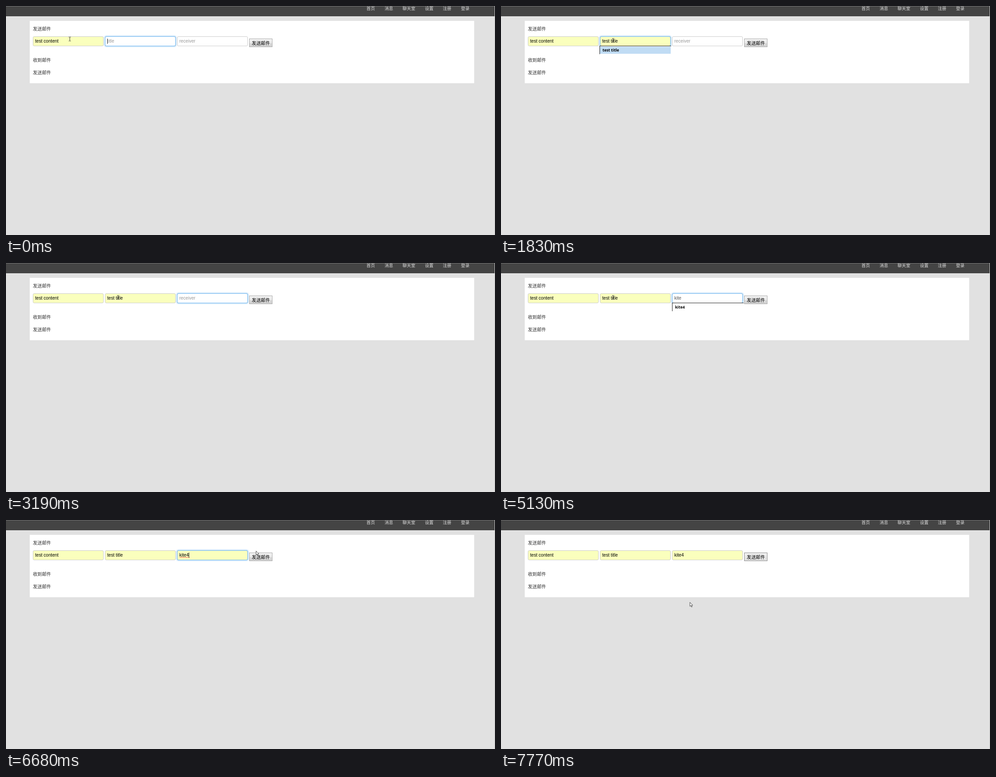
An HTML page that plays this animation: 1092 by 513 pixels, repeating every 8 s.

```html
<!DOCTYPE html>
<html lang="zh">
<head>
<meta charset="utf-8">
<title>发送邮件</title>
<style>
  html, body { margin: 0; width: 100%; height: 100%; overflow: hidden; background: #e1e1e1; }
  svg { display: block; width: 1092px; height: 513px; }
  text { white-space: pre; }
  .zh { font: 10.15px "Noto Sans CJK SC", "Noto Sans CJK", sans-serif; fill: #333; }
  .nav { font-size: 9.5px; fill: #ddd; }
  .input { font: 10.1px "Liberation Sans", Arial, sans-serif; }
  .item { font: bold 8.65px "Open Sans", "Noto Sans", sans-serif; fill: #000; }
</style>
</head>
<body>
<svg id="stage" viewBox="0 0 1092 513">
  <defs>
    <linearGradient id="face" x2="0" y2="1">
      <stop offset="0" stop-color="#f3f3f3"/>
      <stop offset=".5" stop-color="#ebebeb"/>
      <stop offset=".5" stop-color="#dddddd"/>
      <stop offset="1" stop-color="#d0d0d0"/>
    </linearGradient>
    <linearGradient id="facePressed" x2="0" y2="1">
      <stop offset="0" stop-color="#d8d8d8"/>
      <stop offset="1" stop-color="#ececec"/>
    </linearGradient>
    <linearGradient id="faceFocus" x2="0" y2="1">
      <stop offset="0" stop-color="#f2f2f2"/>
      <stop offset="1" stop-color="#dedede"/>
    </linearGradient>
    <filter id="blur" x="-10%" y="-50%" width="120%" height="200%">
      <feGaussianBlur stdDeviation="1.6"/>
    </filter>
  </defs>
</svg>
<script>
const LOOP = 8000;
const NS = "http://www.w3.org/2000/svg";
const stage = document.getElementById("stage");

function add(tag, attrs, parent = stage) {
  const el = document.createElementNS(NS, tag);
  set(el, attrs);
  parent.appendChild(el);
  return el;
}
function set(el, attrs) {
  for (const key in attrs) el.setAttribute(key, attrs[key]);
}
function rect(x, y, width, height, fill, parent) {
  return add("rect", { x, y, width, height, fill }, parent);
}
function label(x, y, words, cls, parent) {
  const el = add("text", { x, y, class: cls }, parent);
  el.textContent = words;
  return el;
}
function show(el, on) {
  el.setAttribute("visibility", on ? "visible" : "hidden");
}

// Page
rect(0, 0, 1092, 23, "#444");
rect(0, 0, 1092, 1, "#777");
rect(1091, 0, 1, 513, "#c4c4c4");
rect(53, 33.3, 992.5, 139.7, "#fff");
[[805, "首页"], [845.5, "消息"], [885.5, "聊天室"], [935.5, "设置"], [975.5, "注册"], [1016, "登录"]]
  .forEach(([x, words]) => label(x, 9, words, "zh nav"));
label(60, 54.8, "发送邮件", "zh");
label(60, 124.8, "收到邮件", "zh");
label(60, 152.8, "发送邮件", "zh");

// Form
function makeField(x, hint) {
  const box = { x: x + .5, y: 68.5, width: 157, height: 21, rx: 2.5 };
  return {
    x, hint,
    glow: add("rect", { ...box, fill: "none", stroke: "#52a8ec", "stroke-width": 2.5, filter: "url(#blur)" }),
    box: add("rect", { ...box, stroke: "#ccc" }),
    ring: add("rect", { ...box, fill: "none", stroke: "#75b9f0" }),
    text: label(x + 5, 82, "", "input")
  };
}
const fields = [makeField(60, "content"), makeField(221, "title"), makeField(382, "receiver")];

const button = add("rect", { x: 543.5, y: 73.5, width: 51, height: 18 });
label(548.8, 86.6, "发送邮件", "zh").style.fill = "#000";

const squiggle = add("path", {
  d: "M387.5 84.3" + "l1.2 -1.2l1.2 1.2".repeat(9),
  fill: "none", stroke: "#f22", "stroke-width": .8
});
const caret = rect(0, 73, .9, 12, "#222");

// Suggestion list
const list = add("g", {});
rect(0, 89, 160, 19, "#fff", list);
const highlight = rect(1, 91, 158, 16, "#c0dcf4", list);
rect(0, 89, 160, 1, "#222", list);
rect(0, 89, 1, 19, "#222", list);
const item = label(6.7, 102.3, "", "item", list);

// Pointers, both with their hot spot at 0,0
const beam = add("path", {
  d: "M-2.2 -4.5H-.5M.5 -4.5H2.2M0 -4V4M-2.2 4.5H-.5M.5 4.5H2.2",
  fill: "none", stroke: "#222", "stroke-width": .9
});
const arrow = add("path", {
  d: "M.4 .4V9.4L2.4 7.5L3.9 11L5.4 10.4L3.9 7H6.7Z",
  fill: "#fff", stroke: "#222", "stroke-width": .8, "stroke-linejoin": "round"
});

const TITLE = "test title";
const RECEIVER = "kite4";

// Each step overrides part of the state from its time on.
const steps = [
  [0, { pointer: beam, px: 142.5, py: 74, title: "", receiver: "", titleFilled: false, receiverFilled: false,
        titleFocus: 1, receiverFocus: 0, active: 1, caret: true, list: false, picked: false,
        squiggle: false, button: "idle" }],
  [150, { px: 140.5 }],
  [290, { px: 205, py: 76, caret: false }],
  [420, { px: 250.5, py: 77 }],
  [860, { title: "te", caret: true, list: true }],
  [1010, { title: "tes" }],
  [1150, { title: "test" }],
  [1710, { caret: false }],
  [1830, { title: TITLE, titleFilled: true, picked: true }],
  [2230, { list: false, picked: false, caret: true }],
  [2640, { titleFocus: .4, receiverFocus: .5, active: 2 }],
  [2760, { titleFocus: 0, receiverFocus: 1 }],
  [3190, { caret: false }],
  [3750, { caret: true }],
  [4150, { receiver: RECEIVER.slice(0, 2), list: true }],
  [4270, { receiver: RECEIVER.slice(0, 3) }],
  [4550, { receiver: RECEIVER.slice(0, 4) }],
  [5130, { caret: false }],
  [5250, { receiver: RECEIVER, receiverFilled: true, picked: true }],
  [5720, { list: false, picked: false, caret: true, squiggle: true }],
  [6150, { pointer: arrow, px: 300, py: 40, caret: false }],
  [6270, { px: 373, py: 4 }],
  [6420, { px: 493, py: 31 }],
  [6560, { px: 545, py: 60 }],
  [6680, { px: 558, py: 69, caret: true }],
  [6800, { px: 563, py: 85, caret: false, squiggle: false, button: "pressed" }],
  [6950, { receiverFocus: .5 }],
  [7070, { receiverFocus: .15, button: "focus" }],
  [7220, { px: 532, py: 97, receiverFocus: 0 }],
  [7370, { px: 520, py: 122 }],
  [7500, { px: 500, py: 150 }],
  [7620, { px: 482, py: 172 }],
  [7770, { px: 421.5, py: 184 }]
];

const buttonLooks = {
  idle: { fill: "url(#face)", stroke: "#a9a9a9" },
  pressed: { fill: "url(#facePressed)", stroke: "#777" },
  focus: { fill: "url(#faceFocus)", stroke: "#8c8c8c" }
};

function stateAt(time) {
  const state = {};
  for (const [start, change] of steps) {
    if (start > time) break;
    Object.assign(state, change);
  }
  return state;
}

function drawField(field, value, filled, focus) {
  set(field.box, { fill: filled ? "#faffbd" : "#fff" });
  set(field.glow, { opacity: focus * .65 });
  set(field.ring, { opacity: focus });
  field.text.textContent = value || field.hint;
  set(field.text, { fill: !value ? "#999" : filled ? "#000" : "#555" });
}

function draw(time) {
  const s = stateAt(time);
  drawField(fields[0], "test content", true, 0);
  drawField(fields[1], s.title, s.titleFilled, s.titleFocus);
  drawField(fields[2], s.receiver, s.receiverFilled, s.receiverFocus);

  const field = fields[s.active];
  const value = s.active === 1 ? s.title : s.receiver;
  const width = value ? field.text.getComputedTextLength() : 0;
  set(caret, { x: field.x + 5 + width });
  show(caret, s.caret);
  show(squiggle, s.squiggle);

  set(list, { transform: `translate(${s.active === 1 ? 220 : 382} 0)` });
  item.textContent = s.active === 1 ? TITLE : RECEIVER;
  list.style.display = s.list ? "" : "none";
  show(highlight, s.picked);

  set(button, buttonLooks[s.button]);
  for (const shape of [beam, arrow]) show(shape, shape === s.pointer);
  set(s.pointer, { transform: `translate(${s.px} ${s.py})` });
}

const began = performance.now();
function tick() {
  draw((performance.now() - began) % LOOP);
  requestAnimationFrame(tick);
}
tick();
</script>
</body>
</html>
```
